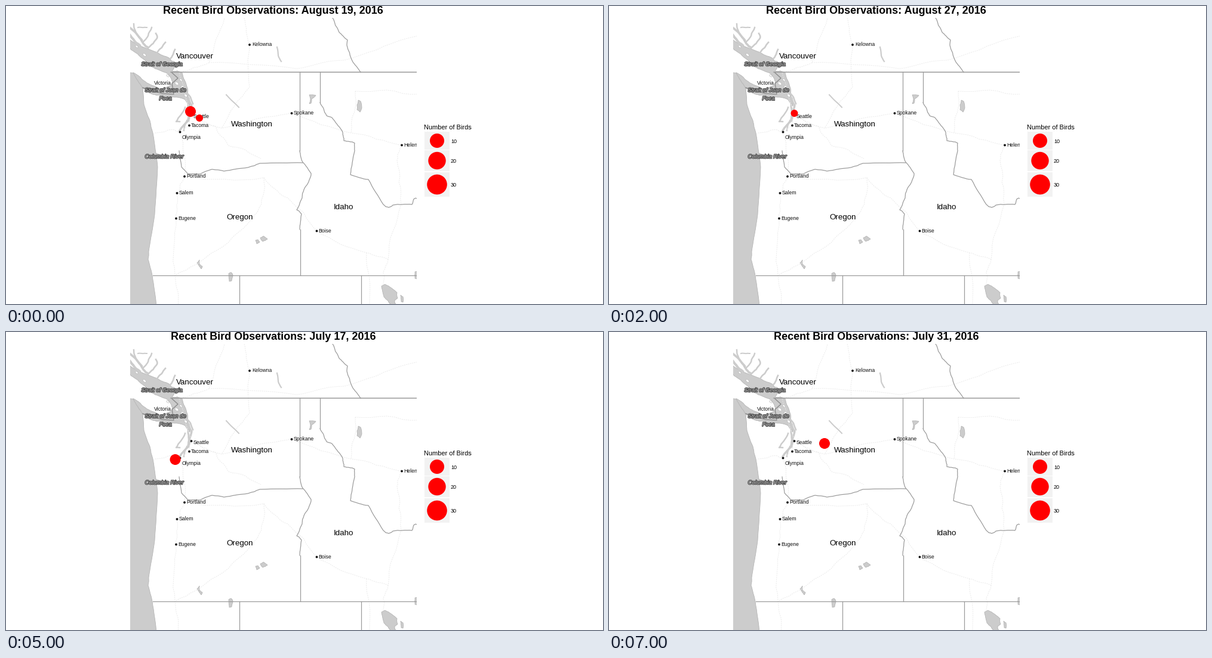
These frames come from a looping animation (1000x500 px, 8 s). A matplotlib script:

```python
import matplotlib.pyplot as plt
import numpy as np
from matplotlib.animation import FuncAnimation
from matplotlib.patches import Circle, Ellipse, Polygon, Rectangle
from matplotlib.patheffects import withStroke

W, H, DPI = 1000, 500, 100
PX = 72 / DPI
LEFT, RIGHT, TOP = 207.5, 687.5, 20
WATER, SHORE, BORDER, ROAD = "#cccccc", "#b4b4b4", "#999999", "#e9e9e9"
RED, INK = "#ff0000", "#111111"

plt.rcParams["font.family"] = "Liberation Sans"
rng = np.random.default_rng(8)
fig = plt.figure(figsize=(W / DPI, H / DPI), dpi=DPI, facecolor="white")


def pixel_axes(x0, x1, y0, y1):
    ax = fig.add_axes([x0 / W, 1 - y1 / H, (x1 - x0) / W, (y1 - y0) / H])
    ax.set(xlim=(x0, x1), ylim=(y1, y0))
    ax.axis("off")
    return ax


page = pixel_axes(0, W, 0, H)
chart = pixel_axes(LEFT, RIGHT, TOP, H)


def rough(points, amp, rounds=3):
    """Roughen a polyline by shifting midpoints sideways."""
    pts = np.array(points, float)
    for _ in range(rounds):
        step = np.diff(pts, axis=0)
        length = np.hypot(*step.T)[:, None] + 1e-6
        normal = np.c_[-step[:, 1], step[:, 0]] / length
        shift = rng.uniform(-amp, amp, (len(step), 1)) * np.minimum(1, length / 6)
        out = np.empty((2 * len(pts) - 1, 2))
        out[::2], out[1::2] = pts, pts[:-1] + step / 2 + normal * shift
        pts, amp = out, amp / 2
    return pts


def line(*points, color=BORDER, width=1.2, amp=0.0, z=3, **style):
    chart.plot(*rough(points, amp).T, color=color, lw=width * PX, zorder=z,
               solid_joinstyle="round", **style)


def inlet(width, *points):
    line(*points, color=WATER, width=width, amp=1.6, z=1)


def water(*points, amp=0.6):
    chart.add_patch(Polygon(rough(points + points[:1], amp), fc=WATER,
                            ec=SHORE, lw=0.8 * PX, zorder=1))


def label(ax, x, y, text, size, color="black", **style):
    return ax.text(x, y, text, fontsize=size * PX, color=color,
                   va="baseline", zorder=6, clip_on=True, **style)


# Pacific coast
water((200, 112), (214, 112), (229, 137), (231, 165), (241, 192), (246, 213),
      (254, 270), (249, 350), (239, 412), (238, 425), (245, 452), (252, 505),
      (200, 505), amp=0.8)
# Straits
water((213, 112), (236, 129), (260, 140), (277, 132), (277, 122), (270, 113),
      (244, 102), (220, 80), (207, 70), (207, 56), (238, 72), (273, 87),
      (284, 95), (278, 109), (295, 112), (304, 138), (308, 168), (298, 156),
      (266, 151), (240, 146), (229, 138), amp=1.8)
# Inlets and sounds
inlet(3.6, (207, 36), (226, 56), (238, 70))
inlet(4, (207, 48), (224, 66))
inlet(2.4, (214, 30), (219, 48), (228, 57))
inlet(2, (221, 36), (236, 36))
inlet(2.4, (230, 60), (238, 50), (244, 36))
inlet(2.6, (238, 70), (253, 54), (251, 46))
inlet(2.6, (253, 78), (267, 61))
inlet(2.6, (275, 89), (283, 73))
inlet(3.4, (306, 155), (311, 167), (306, 192), (291, 209))
inlet(3, (301, 156), (305, 169), (305, 190))
inlet(2.4, (300, 170), (285, 194), (291, 194))
inlet(2.2, (303, 192), (298, 209))
inlet(2.6, (295, 135), (309, 153), (313, 164))
# Islands
for x, y, size in [(286, 130, 7), (293, 124, 5), (285, 139, 5), (296, 136, 6),
                   (301, 150, 6), (219, 68, 5), (232, 82, 6), (271, 117, 5)]:
    chart.add_patch(Ellipse((x, y), size, size * 0.6, angle=40, fc="white",
                            ec=SHORE, lw=0.6 * PX, zorder=2))
# Lakes
line((454, 69), (456, 83), (461, 93), color=WATER, width=2.2, amp=0.6)
line((369, 149), (390, 170), color=WATER, width=2, amp=0.5)
water((508, 149), (519, 150), (512, 156), (511, 163), (508, 164), (510, 156))
water((590, 158), (594, 160), (596, 171), (593, 178), (588, 174), (588, 166))
water((418, 393), (422, 392), (425, 396), (420, 399))
water((426, 389), (431, 386), (438, 391), (430, 395))
water((320, 431), (324, 426), (324, 433), (329, 437), (327, 441))
water((373, 449), (377, 447), (380, 451), (378, 461), (374, 462))
water((685, 446), (690, 445), (690, 459), (685, 457))
water((629, 470), (635, 467), (655, 481), (656, 490), (651, 494), (654, 502),
      (645, 502), (633, 488), amp=1.2)
water((661, 485), (665, 488), (665, 497), (662, 496))

# Borders
line((276, 111.5), (688, 111.5), width=1.5)
line((246, 452.5), (688, 452.5))
for x in (390.5, 594.5):
    line((x, 452), (x, 500))
line((492, 111), (492, 243))
line((492, 243), (497, 262), (511, 281), (507, 295), (499, 308), (496, 322),
     (487, 342), (495, 349), (492, 375), amp=1)
line((492.5, 375), (492.5, 452))
line((526, 111), (526, 162))
line((526, 162), (537, 184), (548, 190), (564, 212), (566, 226), (584, 230),
     (584, 243), (577, 283), (607, 291), (632, 333), (641, 338), (648, 334),
     (680, 333), (683, 324), (688, 323), amp=1.6)
line((547, 20), (558, 44), (572, 57), (571, 66), (580, 92), (594, 111), amp=1.5)
line((290, 243), (294, 270), (305, 282), (325, 282), (345, 274), (365, 277),
     (405, 271), (425, 264), (497, 263), amp=0.8)
line((252, 248), (265, 252), (290, 251), amp=0.8)
line((278, 112), (288, 121), (278, 130), (281, 148), (262, 147), (229, 137),
     color="#888888", width=1.3)

# Towns, with the label offset where it is unusual
towns = {
    "Kelowna": (408, 65), "Spokane": (478.5, 180), "Helena": (663, 233.5),
    "Seattle": (310.5, 183), "Tacoma": (307, 200.5), "Olympia": (291.5, 211.5),
    "Portland": (299, 286), "Salem": (286.5, 314), "Eugene": (285, 356.5),
    "Boise": (520.5, 377.5),
}
offsets = {"Seattle": (3.5, 5.5), "Olympia": (3, 12), "Kelowna": (4, 2.2)}
for name, (x, y) in towns.items():
    dx, dy = offsets.get(name, (3, 2.3))
    chart.add_patch(Circle((x, y), 1.9, fc=INK, lw=0, zorder=5))
    label(chart, x + dx, y + dy, name, 8.7, INK)
label(chart, 247.5, 132.5, "Victoria", 8.7, INK)

# Faint roads between towns and junctions
stops = dict(
    towns, south=(283, 452), exit=(288, 505), pass_=(350, 201), yakima=(372, 234),
    tri=(427, 256), missoula=(578, 213), pend=(432, 288), baker=(472, 322),
    bend=(421, 346), klamath=(353, 410), twin=(604, 414), butte=(655, 258),
    falls=(662, 333), hill=(640, 425), salt=(630, 470), hope=(340, 95),
    north=(399, 20), okanogan=(408, 136), chelan=(361, 205), trail=(486, 105),
    rockies=(578, 88), east=(690, 50), flathead=(585, 143), plains=(690, 148),
    harbour=(250, 213), peak=(366, 20), border=(290, 112), wells=(609, 500),
)
for route in ["border Seattle Tacoma Olympia Portland Salem Eugene south exit",
              "Seattle pass_ yakima tri", "Seattle chelan Spokane missoula Helena",
              "Portland pend baker Boise twin hill falls butte Helena",
              "pend bend klamath south", "north Kelowna okanogan chelan",
              "border hope peak", "hope trail rockies east",
              "flathead plains", "flathead missoula", "hill salt",
              "twin wells", "harbour Olympia"]:
    line(*(stops[s] for s in route.split()), color=ROAD, width=0.9, amp=5,
         z=2, dashes=(2.2, 1.6))

for name, x, y in [("Vancouver", 285, 88.5), ("Washington", 376.5, 202.5),
                   ("Oregon", 369.5, 358.5), ("Idaho", 549, 341)]:
    label(chart, x, y, name, 13.4)

for name, x, y in [("Strait of Georgia", 261, 100.5),
                   ("Strait of Juan de", 267, 144),
                   ("Foca", 267, 158), ("Columbia River", 265, 255.5)]:
    label(chart, x, y, name, 9.5, "#c4c4c4", ha="center", style="italic",
          path_effects=[withStroke(linewidth=1.9 * PX, foreground="#404040")])

# Legend
label(page, 700.5, 207, "Number of Birds", 11)
for count, y, radius, top, bottom in [(10, 226, 12, 211, 240.5),
                                      (20, 259.5, 14.7, 242, 277),
                                      (30, 299.5, 16.8, 279, 320)]:
    page.add_patch(Rectangle((701, top), 42, bottom - top, fc="#f2f2f2", lw=0))
    page.add_patch(Circle((722, y), radius, fc=RED, lw=0, zorder=4))
    label(page, 745, y + 3.7, str(count), 9)

# Date and sightings (x, y, radius) for each second
days = [
    ("August 19", [(309, 177, 9), (324, 188, 6)]),
    ("August 24", [(310.5, 180, 6)]),
    ("August 27", [(310.5, 180, 6)]),
    ("July 02", [(591.5, 167, 12.2)]),
    ("July 10", [(310.5, 183, 9)]),
    ("July 17", [(283.5, 214, 9)]),
    ("July 24", [(346.5, 189.5, 9)]),
    ("July 31", [(361, 187, 9)]),
]
title = label(page, 447.5, 13, "", 18.05, weight="bold", ha="center")
spots = [chart.add_patch(Circle((0, 0), 1, fc=RED, lw=0, zorder=8))
         for _ in range(2)]


def draw(index):
    date, sightings = days[index]
    title.set_text(f"Recent Bird Observations: {date}, 2016")
    for i, spot in enumerate(spots):
        spot.set_visible(i < len(sightings))
        if i < len(sightings):
            x, y, radius = sightings[i]
            spot.set(center=(x, y), radius=radius)
    return [title, *spots]


anim = FuncAnimation(fig, draw, frames=len(days), interval=1000,
                     repeat=True, repeat_delay=0)
plt.show()
```
